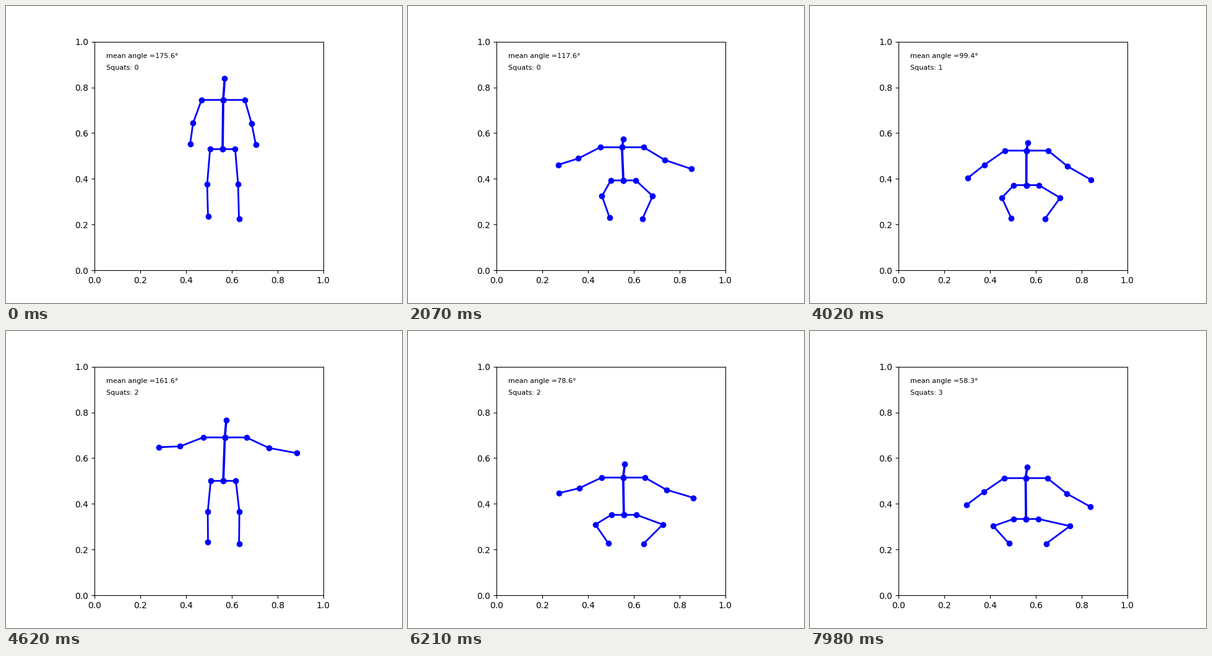
A matplotlib script that plays this animation: 640 by 480 pixels, repeating every 8 s.

```python
import numpy as np
import matplotlib.pyplot as plt
from matplotlib.animation import FuncAnimation

LOOP, STEP = 8000, 20
SIDE, LEFT, BASE = 369.6, 143.7, 426.4   # stage pixels to axes units
STAND, DEEP = 174, 58.3                  # knee angles at the two extremes
REP_TIMES = (2640, 4620, 6840)           # moments a squat is counted

# time in ms, knee angle, arm droop in degrees, sideways lean, head height
KEYS = np.array([
    (0, 175.6, 72, 1.5, 34.5),
    (820, 175.3, 72, 1.5, 34.5),
    (2070, 117.6, 29, -3.7, 13.5),
    (2950, 178.0, 21, 3.5, 32),
    (3090, 178.6, 21, 3.5, 32),
    (4020, 99.4, 37, 0.3, 13),
    (4850, 176.0, 20, 5, 32),
    (5370, 174.8, 18.5, 6.5, 32.5),
    (6210, 78.6, 27.5, -1.7, 21.5),
    (7100, 176.5, 20, 4, 32),
    (7980, 58.3, 36.5, -1, 18),
])


def squat_depth(angle):
    """0 when standing, 1 at the deepest squat."""
    return np.sqrt(np.clip((STAND - angle) / (STAND - DEEP), 0, 1))


def state_at(t):
    """Knee angle, arm droop, lean, head height and depth, eased at time t."""
    k = np.clip(np.searchsorted(KEYS[:, 0], t, side="right") - 1,
                0, len(KEYS) - 2)
    (t0, *a), (t1, *b) = KEYS[k], KEYS[k + 1]
    a, b = [np.append(v, squat_depth(v[0])) for v in (a, b)]
    u = (t - t0) / (t1 - t0)
    return a + (b - a) * u * u * (3 - 2 * u)


def arm(shoulder, side, upper, fore, fore_len):
    """Shoulder, elbow and wrist from two droop angles."""
    chain = [shoulder]
    for deg, size in ((upper, 40), (fore, fore_len)):
        rad = np.radians(min(deg, 82))
        chain.append(chain[-1] + size * np.array([side * np.cos(rad),
                                                  np.sin(rad)]))
    return chain


def skeleton(droop, lean, head_up, q):
    """Joint chains in stage pixels for squat depth q."""
    hip = np.array([350 + 0.4 * lean, 230.5 + 72.5 * q])
    neck = np.array([350 + lean, 151 + 86 * np.sin(np.pi / 2 * q)])
    head = neck + (2.5, -head_up)
    reach = np.cos(np.radians(droop))

    left_arm = arm(neck - (35, 0), -1, droop - 2, 2.6 * droop - 58, 34)
    right_arm = arm(neck + (35, 0), 1, droop + 2, 1.4 * droop - 22,
                    28 + 20 * reach)

    knee_y = 287.5 + 27 * q
    left_leg = [hip - (20.3, 0), (hip[0] - 25 - 28 * q**3, knee_y),
                (327 - 5 * q**6, 339.5 + 3 * q)]
    right_leg = [hip + (20.3, 0), (hip[0] + 25 + 46 * q**2, knee_y),
                 (377 + 5 * q**2, 343)]
    return [[neck, *left_arm], [neck, *right_arm],
            [hip, *left_leg], [hip, *right_leg], [head, neck, hip]]


fig, ax = plt.subplots(figsize=(6.4, 4.8), dpi=100)
ax.set(xlim=(0, 1), ylim=(0, 1), aspect="equal")
lines = [ax.plot([], [], "bo-", lw=w)[0] for w in (2, 2, 2, 2, 2.7)]
angle_text = ax.text(0.05, 0.95, "", fontsize=8, va="top")
count_text = ax.text(0.05, 0.90, "", fontsize=8, va="top")


def update(i):
    t = i * STEP
    angle, *body = state_at(t)
    for line, chain in zip(lines, skeleton(*body)):
        x, y = np.array(chain).T
        line.set_data((x - LEFT) / SIDE, (BASE - y) / SIDE)
    angle_text.set_text(f"mean angle ={angle:.1f}°")
    count_text.set_text(f"Squats: {sum(t >= r for r in REP_TIMES)}")
    return [*lines, angle_text, count_text]


anim = FuncAnimation(fig, update, frames=LOOP // STEP, interval=STEP,
                     init_func=lambda: update(0), repeat=True, repeat_delay=0)
plt.show()
```
